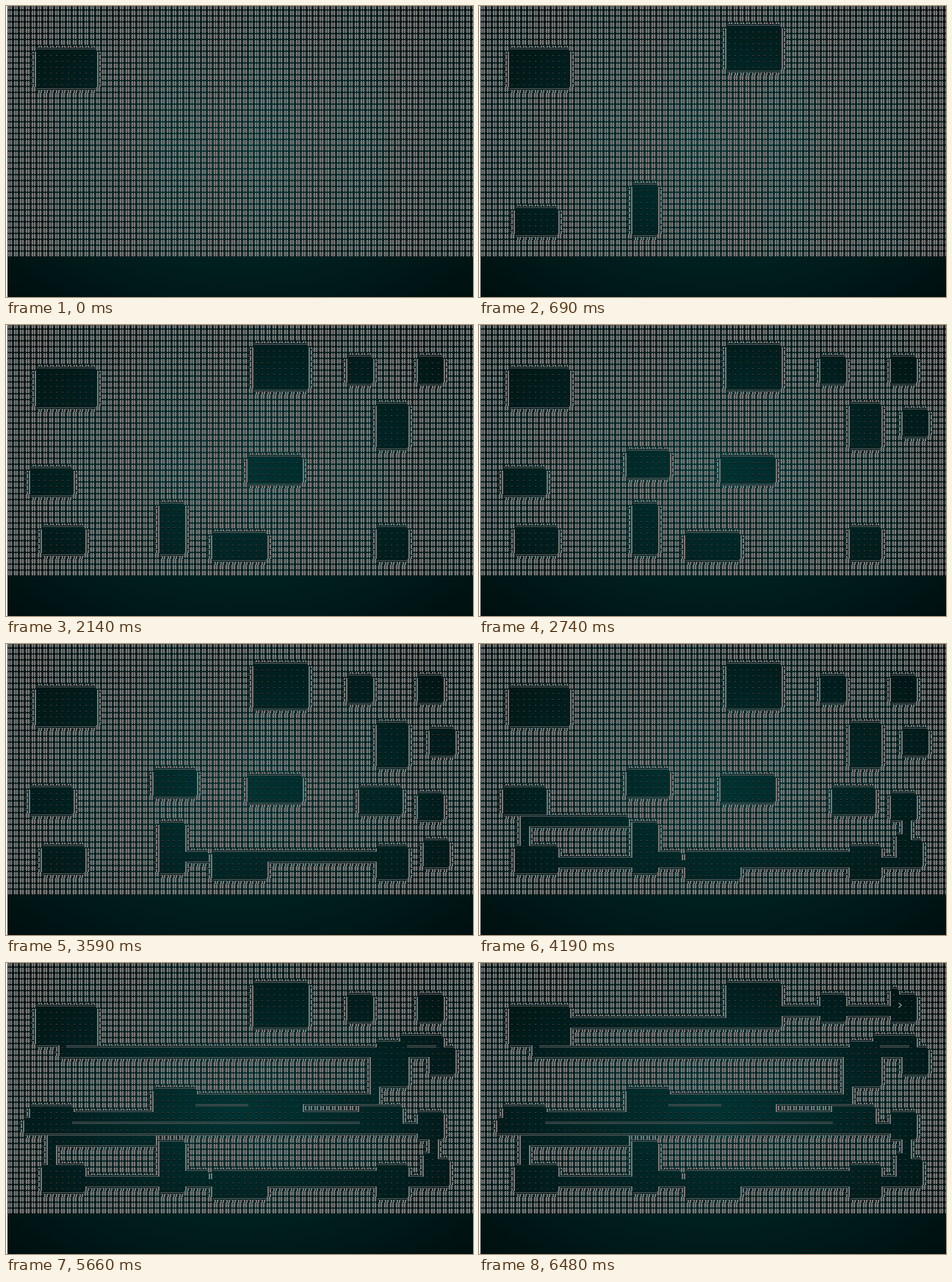
An HTML page with a canvas that plays this animation: 636 by 396 pixels, repeating every 6710 ms.

```html
<!DOCTYPE html>
<html lang="en">
<head>
<meta charset="utf-8">
<title>Dungeon builder</title>
<style>
html, body { margin: 0; width: 100%; height: 100%; overflow: hidden; background: #fff; }
canvas { display: block; }
</style>
</head>
<body>
<canvas id="view" width="636" height="396"></canvas>
<script>
const COLS = 80, ROWS = 43, CELL = 8, LEFT = 2, TOP = -2, LOOP = 6710;
const NORTH = 1, SOUTH = 2, WEST = 4, EAST = 8, ALL = 15;
const ctx = document.getElementById('view').getContext('2d');

// Corridors enter and leave at the room's centre unless a point is given
function room(x, y, { w = 4, h = 4, enter, leave } = {}) {
  const centre = [x + (w >> 1), y + (h >> 1)];
  return { x, y, w, h, enter: enter || centre, leave: leave || centre };
}

const rooms = [
  room(5, 8, { w: 10, h: 6, enter: [9, 11], leave: [14, 10] }),
  room(42, 4, { w: 9, h: 7, leave: [50, 8] }),
  room(26, 31, { h: 8, leave: [25, 30] }),
  room(6, 35, { w: 7, enter: [7, 37], leave: [12, 37] }),
  room(58, 6),
  room(4, 25, { w: 7, enter: [3, 27], leave: [10, 26] }),
  room(41, 23, { w: 9 }),
  room(63, 14, { w: 5, h: 7, enter: [62, 16], leave: [66, 13] }),
  room(70, 6, { enter: [70, 5] }),
  room(63, 35, { w: 5, h: 5, leave: [63, 36] }),
  room(35, 36, { w: 9, leave: [34, 36] }),
  room(72, 15, { enter: [73, 17], leave: [72, 15] }),
  room(25, 22, { w: 7, leave: [31, 23] }),
  room(70, 26),
  room(60, 25, { w: 7, leave: [60, 26] }),
  room(71, 34, { leave: [70, 33] })
];

// Rooms are joined from the lowest to the highest
const bottom = r => r.y + r.h;
const chain = [...rooms].sort((a, b) => bottom(b) - bottom(a));
const exit = chain[chain.length - 1];
const EXIT_STEP = rooms.length + chain.length - 1;

function roomCells({ x, y, w, h }) {
  return Array.from({ length: w * h }, (_, i) => (y + Math.floor(i / w)) * COLS + x + i % w);
}

// Walks sideways first, then up or down; the starting cell stays as it was
function corridorCells(from, to) {
  let [x, y] = from.leave;
  const [endX, endY] = to.enter, cells = [];
  while (x !== endX || y !== endY) {
    if (x !== endX) x += Math.sign(endX - x);
    else y += Math.sign(endY - y);
    cells.push(y * COLS + x);
  }
  return cells;
}

const steps = [
  ...rooms.map(roomCells),
  ...chain.slice(1).map((r, i) => corridorCells(chain[i], r))
];

// Step and time pairs; steps between them are evenly spaced
const PACE = [[0, 0], [10, 2140], [11, 2390], [16, 3360], [20, 4190], [22, 4660], [24, 5040],
  [31, 6480], [32, LOOP]];

function stepAt(t) {
  const i = PACE.findIndex(p => p[1] > t);
  const [s0, t0] = PACE[i - 1], [s1, t1] = PACE[i];
  return Math.floor(s0 + (t - t0) / (t1 - t0) * (s1 - s0) + 1e-6);
}

// Scanlines darken every row, even ones more
function sprite(level, paint) {
  const c = document.createElement('canvas');
  c.width = c.height = CELL;
  const g = c.getContext('2d');
  const grey = drop => {
    const v = Math.round((level - drop) * 255);
    return `rgb(${v},${v},${v})`;
  };
  g.fillStyle = grey(0.125);
  paint(g);
  g.globalCompositeOperation = 'source-atop';
  g.fillStyle = grey(0.375);
  for (let y = 0; y < CELL; y += 2) g.fillRect(0, y, CELL, 1);
  return c;
}

// Double lines: a band along each arm with its middle cut out
function paintWall(g, arms) {
  const on = (arm, method, ...box) => { if (arms & arm) g[method](...box); };
  on(NORTH, 'fillRect', 2, 0, 5, 5);
  on(SOUTH, 'fillRect', 2, 2, 5, 6);
  on(WEST, 'fillRect', 0, 2, 7, 3);
  on(EAST, 'fillRect', 2, 2, 6, 3);
  on(NORTH, 'clearRect', 4, 0, 1, 4);
  on(SOUTH, 'clearRect', 4, 3, 1, 5);
  on(WEST, 'clearRect', 0, 3, 5, 1);
  on(EAST, 'clearRect', 4, 3, 4, 1);
}

function paintHash(g) {
  for (const x of [1, 4]) g.fillRect(x, 0, 2, 7);
  for (const y of [2, 4]) g.fillRect(0, y, 7, 1);
}

function paintArrow(g) {
  for (let y = 0; y < 7; y++) g.fillRect(4 - Math.abs(y - 3), y, 2, 1);
}

function wallSprite(mask) {
  if (mask === ALL) return sprite(0.715, paintHash);
  const vertical = NORTH | SOUTH, sideways = WEST | EAST;
  const arms = !(mask & sideways) ? vertical : !(mask & vertical) ? sideways : mask;
  return sprite(0.715, g => paintWall(g, arms));
}

const walls = Array.from({ length: ALL + 1 }, (_, mask) => wallSprite(mask));
const dot = sprite(0.394, g => g.fillRect(2, 5, 2, 2));
const arrow = sprite(0.787, paintArrow);

function drawBackground() {
  ctx.save();
  ctx.clearRect(0, 0, 636, 396);
  ctx.translate(LEFT, TOP);
  ctx.scale(640, 400);
  const glow = ctx.createRadialGradient(0.5, 0.5, 0, 0.5, 0.5, Math.SQRT1_2);
  glow.addColorStop(0, 'rgb(0,51,51)');
  glow.addColorStop(1, 'rgb(0,15,15)');
  ctx.fillStyle = glow;
  ctx.fillRect(0, 0, 1, 1);
  ctx.restore();
}

function wallMask(floor, x, y) {
  if (x < 1 || y < 1 || x > COLS - 2 || y > ROWS - 2) return ALL;
  const i = y * COLS + x;
  const side = (j, bit) => floor.has(j) ? 0 : bit;
  return side(i - COLS, NORTH) | side(i + COLS, SOUTH) | side(i - 1, WEST) | side(i + 1, EAST);
}

function draw(step) {
  const floor = new Set(steps.slice(0, step + 1).flat());
  drawBackground();
  for (let y = 0; y < ROWS; y++)
    for (let x = 0; x < COLS; x++) {
      const isExit = step >= EXIT_STEP && x === exit.x + 1 && y === exit.y + 1;
      const tile = isExit ? arrow : floor.has(y * COLS + x) ? dot : walls[wallMask(floor, x, y)];
      ctx.drawImage(tile, LEFT + x * CELL, TOP + y * CELL);
    }
}

let shown = -1;
const start = performance.now();
function tick() {
  const step = stepAt((performance.now() - start) % LOOP);
  if (step !== shown) draw(shown = step);
  requestAnimationFrame(tick);
}
tick();
</script>
</body>
</html>
```
